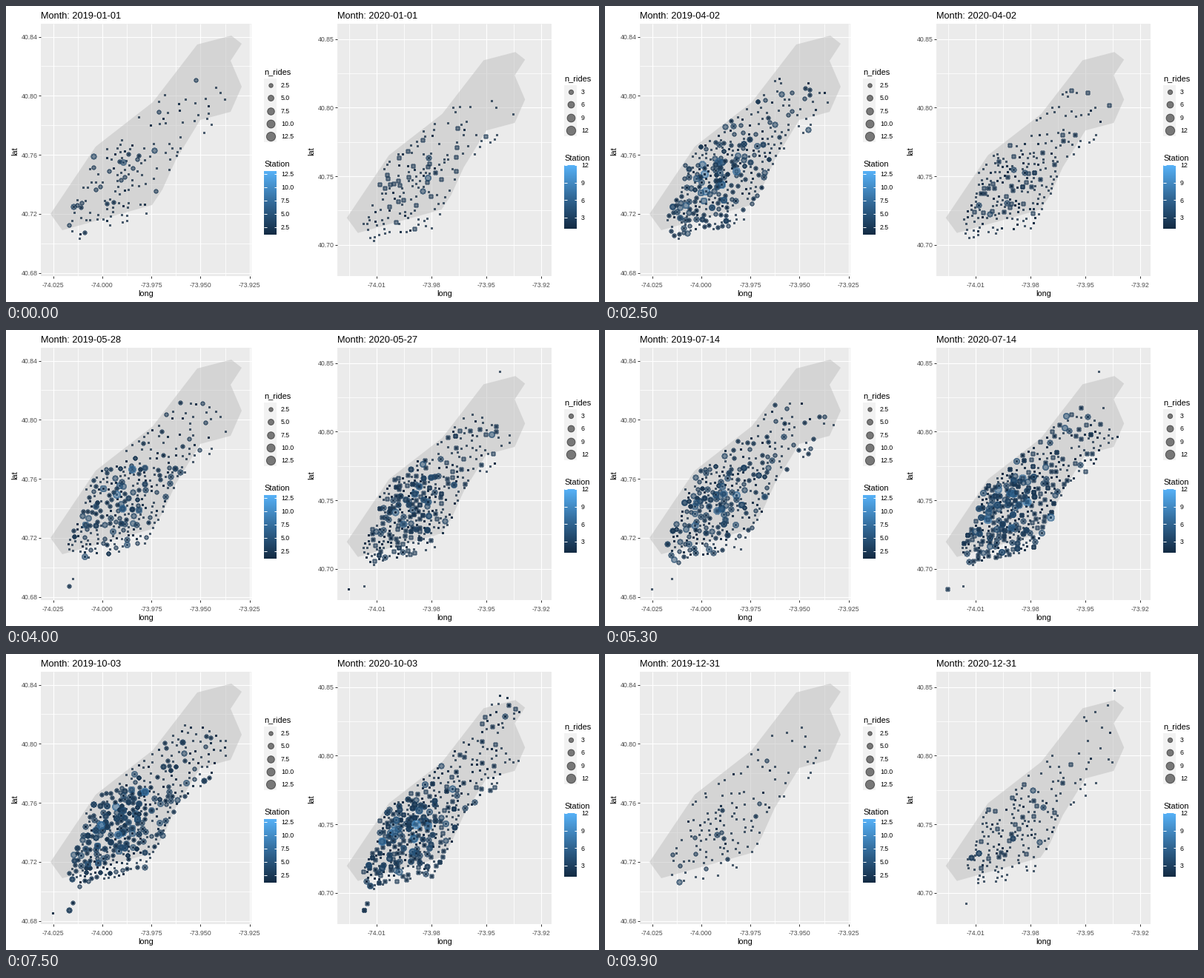
A matplotlib script that plays this animation: 800x400 px, repeating every 10 s.

```python
import numpy as np
import matplotlib.pyplot as plt
from matplotlib.animation import FuncAnimation
from matplotlib.colors import LinearSegmentedColormap
from matplotlib.patches import Polygon, Rectangle
from matplotlib.path import Path

W, H, DPI = 800, 400, 100
FRAMES, STEP = 100, 100
PX = 72 / DPI  # points per pixel

plt.rcParams["font.family"] = ["Liberation Sans", "DejaVu Sans"]
BLUES = LinearSegmentedColormap.from_list(
    "blues", ["#132B43", "#336A98", "#56B1F7"])

fig = plt.figure(figsize=(W / DPI, H / DPI), dpi=DPI, facecolor="white")
ax = fig.add_axes([0, 0, 1, 1])
ax.axis("off")

# Outlines in left-panel pixels: the island, its stations, later growth.
ISLAND = [(60, 281), (121, 190), (198, 130), (258, 52), (304, 40), (318, 51),
          (303, 74), (318, 109), (303, 143), (262, 154), (229, 208),
          (211, 248), (197, 269), (76, 303)]
SERVED = [(97, 319), (84, 300), (84, 285), (106, 238), (108, 215), (122, 197),
          (180, 148), (237, 94), (262, 97), (313, 127), (277, 152),
          (279, 168), (238, 196), (203, 262), (183, 297), (118, 306)]
UPTOWN = [(250, 90), (258, 66), (285, 15), (315, 30), (305, 90)]
HUBS = [(122, 199), (157, 241), (188, 216), (93, 285), (150, 228)]
OUTPOSTS = [(63, 350), (85, 346), (90, 336), (281.5, 34.4)]

SEASON = np.array([0, 0.15, 0.25, 0.4, 0.53, 0.75, 1])


def to_right(p):
    return (np.asarray(p, float) - (129, 121)) * (0.9321, 0.9298) + (524.1, 137.5)


def scatter_in(shape, seeds, rng, gap_at, tries):
    """Add random points inside a shape, keeping a minimum distance."""
    path = Path(shape + shape[:1])
    points = list(seeds)
    low, high = np.min(shape, axis=0), np.max(shape, axis=0)
    for p in rng.uniform(low, high, (tries, 2)):
        if path.contains_point(p):
            if np.hypot(*(np.array(points) - p).T).min() > gap_at(p[1]):
                points.append(tuple(p))
    return points


def make_stations():
    """Positions, mean daily rides and opening time (0 to 1) of all stations."""
    rng = np.random.default_rng(2019)
    main = scatter_in(SERVED, HUBS, rng, lambda y: 5.2 if y > 185 else 6.6, 9000)
    later = scatter_in(UPTOWN, OUTPOSTS, rng, lambda y: 6.5 if y > 55 else 10, 900)
    pos = np.array(main + later)

    dx, dy = pos[:, 0] - 146, pos[:, 1] - 236
    along, across = 0.69 * dx - 0.725 * dy, 0.725 * dx + 0.69 * dy
    mean = 0.25 + 0.9 * np.exp(-(along / 78) ** 2 - (across / 40) ** 2)
    mean *= rng.lognormal(-0.1, 0.45, len(pos))
    mean[:len(HUBS)] *= 2

    opens = np.zeros(len(pos))
    opens[len(main):] = 0.5 + (95 - pos[len(main):, 1]) / 280
    outposts = slice(len(main), len(main) + len(OUTPOSTS))
    opens[outposts], mean[outposts] = 0.34, 0.4
    return pos, mean, opens


STATIONS, MEAN, OPENS = make_stations()


def label(x, y, s, size, color="black", **kw):
    return ax.text(x, y, s, fontsize=size * PX, color=color, **kw)


def box(x0, y0, x1, y1, color):
    patch = Rectangle((x0, y0), x1 - x0, y1 - y0, fc=color, lw=0, zorder=0)
    return ax.add_patch(patch)


def line(x0, y0, x1, y1, color, width=1, z=1):
    ax.plot([x0, x1], [y0, y1], color=color, lw=width * PX, zorder=z,
            solid_capstyle="butt")


def area(n, top):
    """Marker area for a ride count, on a square-root size scale."""
    size = 1 + 5 * np.sqrt((np.asarray(n, float) - 1) / (top - 1))
    radius = 1.067 * size - 0.2
    return (2 * radius * PX) ** 2


def dots(points, n, top, color):
    return ax.scatter(*np.transpose(points), s=area(n, top), c=[color],
                      edgecolors=[color], linewidths=PX, marker="o",
                      antialiaseds=False, zorder=3)


class Panel:
    TOP, BOTTOM = 24, 365

    def __init__(self, x0, x1, year, last_day, top, place, north, activity):
        self.x0, self.x1, self.top, self.year = x0, x1, top, year
        self.first, self.last_day = np.datetime64(f"{year}-01-01"), last_day
        self.activity = activity
        use = STATIONS[:, 1] > north
        self.pos = np.floor(place(STATIONS[use])) + 0.5
        self.mean, self.opens = MEAN[use], OPENS[use]
        back = box(x0, self.TOP, x1, self.BOTTOM, "#EBEBEB")
        ax.add_patch(Polygon(place(ISLAND), fc="#BEBEBE", alpha=0.5, lw=0, zorder=2))
        self.title = label(x0, 17, "", 12.8)
        self.dots = dots([(0, 0)], [1], top, (0, 0, 0, 0))
        self.dots.set_clip_path(back)

    def axes(self, xticks, yticks, x, dx, y, dy):
        for k in range(-1, 11):
            width = 0.8 if k % 2 else 1.1
            u, v = x + k * dx / 2, y + k * dy / 2
            if self.x0 < u < self.x1:
                line(u, self.TOP, u, self.BOTTOM, "white", width)
            if self.TOP < v < self.BOTTOM:
                line(self.x0, v, self.x1, v, "white", width)
        for k, s in enumerate(xticks):
            u = x + k * dx
            line(u, self.BOTTOM, u, self.BOTTOM + 3, "#333333")
            label(u, 379.5, s, 8.8, "#4D4D4D", ha="center")
        for k, s in enumerate(yticks):
            v = y + k * dy
            line(self.x0 - 3, v, self.x0, v, "#333333")
            label(self.x0 - 4.5, v + 3.5, s, 8.8, "#4D4D4D", ha="right")
        label((self.x0 + self.x1) / 2, 392.5, "long", 10.8, ha="center")
        label(self.x0 - 35, 196, "lat", 10.8, rotation=90, ha="center", va="center")

    def legends(self, x, keys, key_y, bar_y, fmt):
        mid, end, step = x + 8.5, x + 17, 17.28
        label(x, key_y - 6, "n_rides", 11)
        box(x, key_y, end, key_y + step * len(keys), "#F2F2F2")
        label(x, bar_y - 6, "Station", 11)
        ax.imshow(np.linspace(1, 0, 86)[:, None], cmap=BLUES, aspect="auto",
                  extent=(x, end, bar_y + 86, bar_y), zorder=1)
        for k, n in enumerate(keys):
            y = key_y + step * (k + 0.5)
            dots([(mid, np.floor(y) + 0.5)], [n], self.top, (0, 0, 0, 0.5))
            label(x + 23, y + 3.5, fmt % n, 8.8)
            y = bar_y + 86.4 * (self.top - n) / (self.top - 1)
            line(x, y, x + 3.5, y, "white", z=2)
            line(end - 3.5, y, end, y, "white", z=2)
            label(x + 23, y + 3.5, fmt % n, 8.8)

    def rides_on(self, day):
        """Rides per station on one day."""
        rng = np.random.default_rng([self.year, day])
        t = day / self.last_day
        busy = np.interp(t, SEASON, self.activity) * rng.lognormal(0, 0.12)
        rides = rng.poisson(self.mean * busy * rng.gamma(4, 0.25, len(self.pos)))
        return np.where(self.opens <= t, np.minimum(rides, self.top), 0)

    def update(self, i):
        scale = self.last_day / (FRAMES - 1)
        self.title.set_text(f"Month: {self.first + int(i * scale)}")

        # All days that round to this moment lie on top of each other.
        days = np.arange(self.last_day + 1)
        days = days[np.rint(days / scale) == i]
        rides = np.concatenate([self.rides_on(d) for d in days])
        pos = np.tile(self.pos, (len(days), 1))[rides > 0]
        n = rides[rides > 0]
        colors = BLUES((n - 1) / (self.top - 1))
        colors[:, 3] = 0.5
        self.dots.set_offsets(pos)
        self.dots.set_sizes(area(n, self.top))
        self.dots.set_facecolor(colors)
        self.dots.set_edgecolor(colors)


left = Panel(47, 331, 2019, 364, 13, np.asarray, 90,
             [0.45, 0.55, 1.05, 0.9, 1.15, 1.35, 0.35])
left.axes(["-74.025", "-74.000", "-73.975", "-73.950", "-73.925"],
          ["40.84", "40.80", "40.76", "40.72", "40.68"], 63.5, 66.3, 41.6, 79.75)
left.legends(348, [2.5, 5, 7.5, 10, 12.5], 98, 223, "%.1f")

right = Panel(447, 736, 2020, 365, 12, to_right, 0,
              [0.45, 0.9, 0.35, 0.8, 1.15, 1.35, 0.45])
right.axes(["-74.01", "-73.98", "-73.95", "-73.92"],
           ["40.85", "40.80", "40.75", "40.70"], 499.6, 74.1, 44.6, 92.7)
right.legends(753, [3, 6, 9, 12], 107, 215, "%d")

ax.set_xlim(0, W)
ax.set_ylim(H, 0)


def draw(i):
    left.update(i)
    right.update(i)
    return left.dots, right.dots, left.title, right.title


anim = FuncAnimation(fig, draw, frames=FRAMES, interval=STEP,
                     init_func=lambda: draw(0), repeat=True, repeat_delay=0)
plt.show()
```
